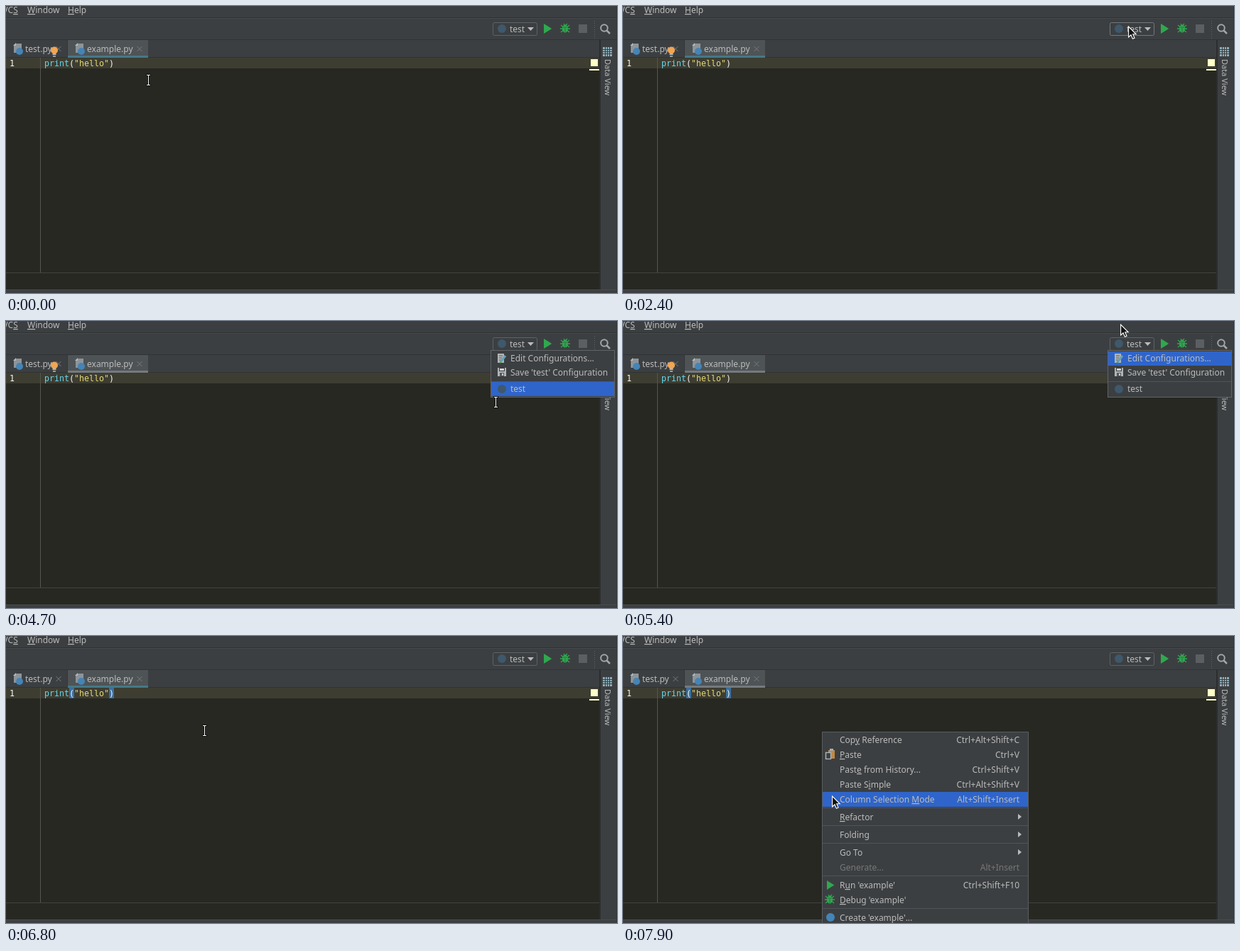
An HTML page that plays this animation: 860x405 px, repeating every 8 s.

```html
<!DOCTYPE html>
<html lang="en">
<head>
<meta charset="utf-8">
<title>Run configuration</title>
<style>
  html, body { margin: 0; width: 100%; height: 100%; overflow: hidden; background: #272822; }
  svg { display: block; }
  text { font: 12px "Noto Sans", sans-serif; fill: #bbb; white-space: pre; }
  .code { font: 11.63px "DejaVu Sans Mono", monospace; fill: #f8f8f2; }
  .side { font-size: 11px; }
  .off { fill: #777; }
  .end { text-anchor: end; }
  .u { text-decoration: underline; }
</style>
</head>
<body>
<svg id="stage" width="860" height="405" viewBox="0 0 860 405"></svg>
<script>
const LOOP = 8000, STEP = 100;
const PANEL = '#3c3f41', EDITOR = '#272822', BLUE = '#2f65ca', GREEN = '#2fa84f';

const rect = (x, y, w, h, fill, more = '') =>
  `<rect x="${x}" y="${y}" width="${w}" height="${h}" fill="${fill}" ${more}/>`;
const path = (d, fill, more = '') => `<path d="${d}" fill="${fill}" ${more}/>`;
const line = (d, stroke, width = 1) => path(d, 'none', `stroke="${stroke}" stroke-width="${width}"`);
const dot = (x, y, r, fill) => `<circle cx="${x}" cy="${y}" r="${r}" fill="${fill}"/>`;
const group = (id, body) => `<g id="${id}">${body}</g>`;
const at = (x, y, body) => `<g transform="translate(${x} ${y})">${body}</g>`;

// An underscore marks the underlined mnemonic that follows it.
const text = (x, y, label, cls = '') =>
  `<text x="${x}" y="${y}" class="${cls}">${label.replace(/_(.)/, '<tspan class="u">$1</tspan>')}</text>`;

const dimDot = (x, y) => dot(x, y, 6, '#3f586b');
const play = (x, y, h) => path(`M${x} ${y}l${h * 0.8} ${h / 2}l${-h * 0.8} ${h / 2}z`, GREEN);
const bug = (x, y) => at(x, y,
  line('M-6 -5L6 5M6 -5L-6 5M-7 0H7M-2 -7L0 -4L3 -7', GREEN, 1.3) +
  `<ellipse rx="4" ry="5.5" fill="${GREEN}"/>` + line('M-3 -2H3M0 -1V5', '#315f40', 0.8));
const fileIcon = x => path(`M${x + 4} 53h8v13h-11v-10z`, '#8d9499') +
  path(`M${x} 56l4 -4v4z`, '#b4babd') + dot(x + 9, 64, 5, '#4584b6');
const close = x => line(`M${x - 3.5} 57l7 7m0 -7l-7 7`, '#787b7d');

function toolbar() {
  return rect(0, 0, 860, 73, PANEL) +
    text(-4.5, 10, 'VC_S') + text(30, 10, '_Window') + text(87, 10, '_Help') +
    rect(0, 16, 860, 1, '#2e3132') + rect(0, 17, 860, 1, '#484b4d') +
    rect(685.5, 23.5, 62, 18, PANEL, 'id="runBox" rx="2"') +
    dimDot(698, 32) + text(709, 37, 'test') + path('M734 30h9l-4.5 5z', '#bbb') +
    play(757, 25, 14) + bug(787, 32) + rect(806, 26, 12, 12, '#5c5f61') +
    `<path d="M828.5 21V46" stroke="#626567" stroke-dasharray="1 2"/>` +
    '<circle cx="842" cy="31" r="4.8" fill="none" stroke="#a2a6a8" stroke-width="2"/>' +
    line('M845.5 34.5L850 39', '#a2a6a8', 2.5) +
    rect(0, 47, 860, 1, '#303335');
}

function tabs() {
  return fileIcon(10) + text(27, 65, 'test.py') + close(74) +
    rect(86, 48, 1, 25, '#343739') + rect(87, 48, 113, 22, '#4e5356') +
    rect(87, 70, 113, 3, '#467886', 'id="tabLine"') +
    fileIcon(97) + text(114, 65, 'example.py') + close(188) +
    rect(0, 72, 87, 1, '#303335') + rect(200, 72, 636, 1, '#303335') +
    group('bulb', dot(68, 62.5, 5, '#f2a552') + rect(65.5, 67, 5, 2, '#b4b7b8') + rect(66, 70, 4, 2, '#9b9e9f'));
}

function editor() {
  return rect(0, 73, 836, 328, EDITOR) + rect(0, 73, 836, 15, '#3e3d32') +
    group('brackets', rect(89, 73, 7, 15, '#3b6f9e') + rect(145, 73, 7, 15, '#3b6f9e')) +
    text(5, 85, '1', 'code') +
    '<text x="54" y="85" class="code"><tspan fill="#66d9ef">print</tspan>(<tspan fill="#e6db74">"hello"</tspan>)</text>' +
    rect(48, 73, 1, 304, '#555650') + rect(0, 376, 836, 1, '#414340') +
    rect(823, 75, 10, 10, '#ffffc8') + rect(821, 89, 14, 2, '#ffffc8') +
    rect(0, 400, 860, 5, PANEL) + rect(0, 400, 860, 1, '#4a4d4f');
}

function sidebar() {
  return rect(835, 48, 25, 352, PANEL) + rect(835, 48, 2, 352, '#2b2d2e') +
    rect(840, 58, 13, 13, '#8fadb8') +
    line('M840 61.5h13m-13 3h13m-13 3h13M843.5 58v13m3 -13v13m3 -13v13', PANEL) +
    `<text class="side" transform="translate(843 75) rotate(90)">Data View</text>` +
    rect(859, 0, 1, 405, '#2f3233');
}

function runPopup() {
  const pencil = rect(692, 46, 9, 13, '#b0b4b6') + line('M694 49h5m-5 3h4m-4 3h3', '#585c5e') +
    line('M696 58l7 -9', '#66a3b5', 3) + line('M695 59l2 -2', '#5aa65a', 2);
  const floppy = rect(692, 66, 12, 12, '#b0b4b6') + rect(694, 66, 8, 5, PANEL) +
    rect(695, 67, 6, 3, '#d0d2d3') + rect(695, 73, 6, 5, '#55595b') + rect(698, 74, 2, 3, '#c8caca');
  return rect(682.5, 41.5, 174, 66, PANEL, 'stroke="#616466"') +
    rect(683, 43, 173, 20, BLUE, 'id="popupRow"') + rect(683, 85, 173, 1, '#515456') +
    pencil + text(710, 57, 'Edit Configurations...') +
    floppy + text(710, 77, "Save 'test' Configuration") +
    dimDot(698, 96) + text(710, 100, 'test');
}

const ROWS = [
  [146, 'Cop_y Reference', 'Ctrl+Alt+Shift+C'],
  [167, '_Paste', 'Ctrl+V'],
  [188, 'Past_e from History...', 'Ctrl+Shift+V'],
  [209, 'Paste S_imple', 'Ctrl+Alt+Shift+V'],
  [230, 'Column Selection _Mode', 'Alt+Shift+Insert'],
  [255, '_Refactor', '>'],
  [280, 'Folding', '>'],
  [305, 'Go To', '>'],
  [326, 'Generate...', 'Alt+Insert', 'off'],
  [351, "R_un 'example'", 'Ctrl+Shift+F10'],
  [372, "_Debug 'example'", ''],
  [397, "Create 'example'...", '']
];

function contextMenu() {
  const rows = ROWS.map(([y, label, key, cls = '']) =>
    text(305, y + 5, label, cls) +
    (key === '>' ? path(`M556 ${y - 4}l5 4l-5 4z`, '#bbb') : text(558, y + 5, key, 'end ' + cls)));
  const clipboard = rect(289, 161, 9, 12, '#c08a45') + rect(291, 159, 5, 3, '#a9adaf') +
    rect(285.5, 164.5, 7, 9, PANEL, 'stroke="#b0b4b6" stroke-width="1.4"');
  return rect(280.5, 135.5, 290, 280, PANEL, 'stroke="#5a5d5f"') +
    rect(281, 220, 289, 21, BLUE, 'id="menuRow"') +
    [242, 267, 292, 338, 384].map(y => rect(281, y, 289, 1, '#515456')).join('') +
    rows.join('') + clipboard + play(287, 345, 13) + bug(291, 372) + dot(292, 397, 6, '#4584b6');
}

const beam = rect(-3, -8, 7, 3, '#111') + rect(-3, 6, 7, 3, '#111') + rect(-1, -8, 3, 17, '#111') +
  rect(-2, -7, 5, 1, '#fff') + rect(-2, 7, 5, 1, '#fff') + rect(0, -7, 1, 15, '#fff');
const arrow = path('M.6 1.2V16L4 12.8L6.4 18.3L9 17.2L6.7 11.8H11.2z', '#111', 'stroke="#fff" stroke-width="1.1"');

const $ = id => document.getElementById(id);
$('stage').innerHTML = toolbar() + tabs() + editor() + sidebar() +
  group('popup', runPopup()) + group('menu', contextMenu()) +
  group('cursor', group('beam', beam) + group('arrow', arrow));

// Pointer path: time, x, y
const POINTER = [
  [0, 200, 104], [200, 195, 104], [300, 195, 104], [700, 165, 90], [1100, 129, 54],
  [1300, 129, 54], [1400, 128, 55], [1500, 128, 55], [1800, 290, 128], [1900, 390, 144],
  [2100, 570, 120], [2300, 700, 45], [2400, 711, 28], [3100, 711, 28], [3500, 698, 54],
  [3800, 672, 88], [3900, 664, 108], [4000, 643, 133], [4300, 655, 167], [4500, 682, 125],
  [4600, 689, 97], [4700, 689, 114], [4800, 684, 136], [4900, 683, 118], [5100, 694, 74],
  [5200, 698, 52], [5400, 700, 4], [5500, 699, 12], [5700, 683, 59], [5900, 470, 195],
  [6000, 390, 234], [6100, 390, 234], [6200, 390, 233], [6400, 390, 233], [6800, 279, 133],
  [7500, 279, 133], [7600, 284, 215], [7700, 289, 332], [7800, 293, 285], [7900, 294, 225]
];

function pointerAt(t) {
  const next = POINTER.findIndex(p => p[0] > t);
  if (next < 0) return POINTER[POINTER.length - 1].slice(1);
  const [t0, x0, y0] = POINTER[next - 1], [t1, x1, y1] = POINTER[next];
  const k = (t - t0) / (t1 - t0);
  return [Math.round(x0 + (x1 - x0) * k), Math.round(y0 + (y1 - y0) * k)];
}

const show = (id, on) => $(id).setAttribute('display', on ? 'inline' : 'none');

function draw(ms) {
  const t = Math.floor(ms / STEP) * STEP;
  const [x, y] = pointerAt(t);
  const popup = t >= 3100 && t < 6400, clicked = t >= 6400, menu = t >= 7200;

  show('popup', popup);
  show('menu', menu);
  show('bulb', !clicked);
  show('brackets', clicked);
  $('tabLine').setAttribute('fill', popup || menu ? '#747a7e' : '#467886');
  $('runBox').setAttribute('stroke', t >= 2400 && t < 3100 ? '#74787a' : '#606365');

  const popupRow = t < 4600 || t >= 5200 ? 43 : t < 5100 ? 86 : 63;
  $('popupRow').setAttribute('y', popupRow);

  const row = menu && ROWS.find(r => y >= r[0] - 10 && y < r[0] + 11 && r[3] !== 'off');
  show('menuRow', row);
  if (row) $('menuRow').setAttribute('y', row[0] - 10);

  const overPopup = popup && x > 682 && y < 108;
  const inEditor = y > 72 && x < 836 && !overPopup && !menu;
  show('beam', inEditor);
  show('arrow', !inEditor);
  $('cursor').setAttribute('transform', `translate(${x} ${y})`);
}

const start = performance.now();
function tick() {
  draw((performance.now() - start) % LOOP);
  requestAnimationFrame(tick);
}
tick();
</script>
</body>
</html>
```
